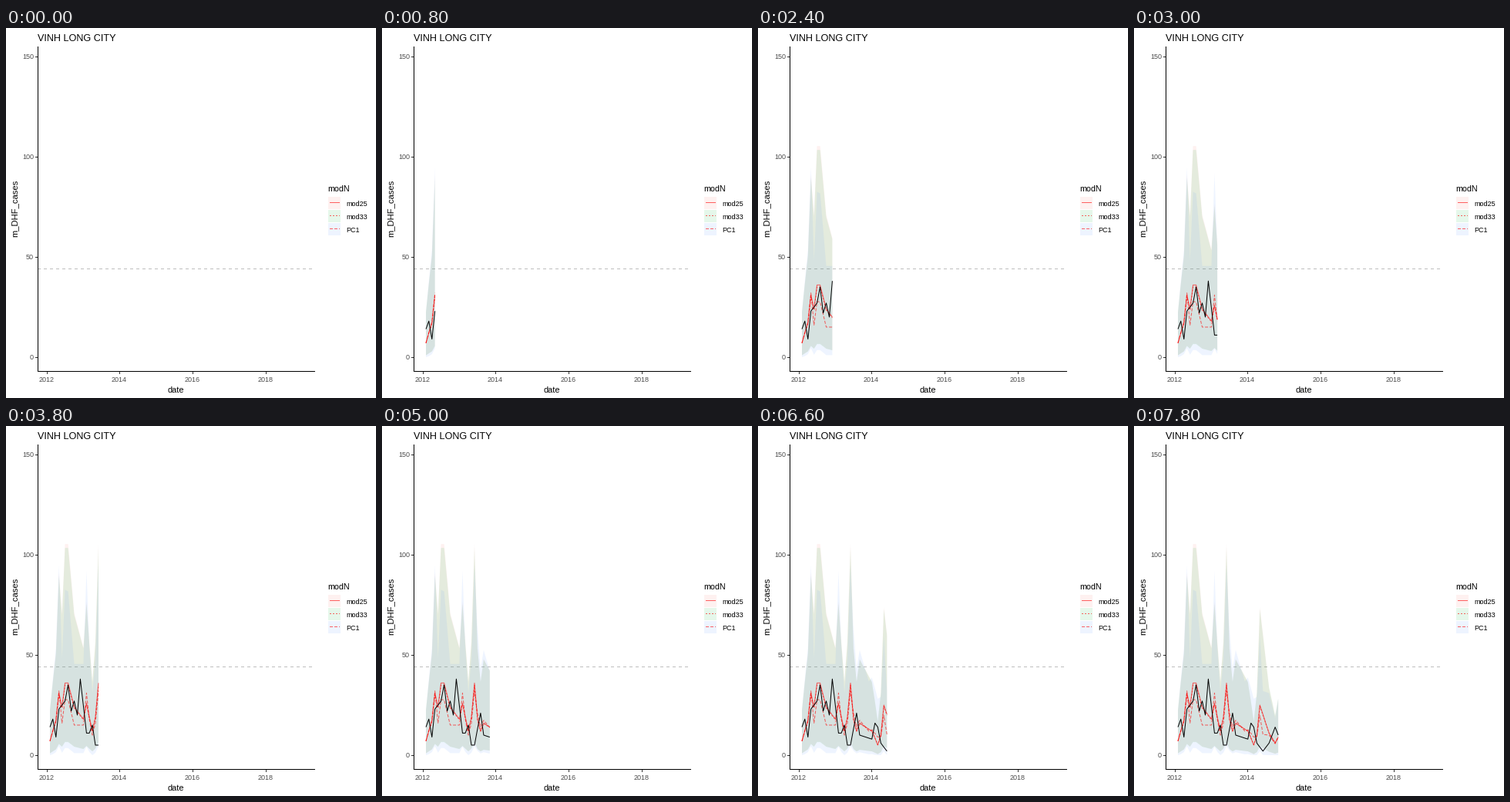
Recreate the animation shown at these times as a matplotlib script. Size 480 px wide and 480 px high, loop 8000 ms.

```python
import numpy as np
import matplotlib.pyplot as plt
from matplotlib.animation import FuncAnimation
from matplotlib.patches import Polygon, Rectangle

plt.rcParams["font.family"] = ["Liberation Sans", "DejaVu Sans"]
plt.rcParams["lines.scale_dashes"] = False

FRAMES, INTERVAL = 40, 200
REVEAL = 100          # frames the full reveal up to the end of 2018 would take
MONTHS = 34
RED, LINE_ALPHA, FILL_ALPHA = "#ff0000", 0.6, 0.1
FILLS = ["#f8766d", "#00ba38", "#619cff"]
NAMES = ["mod25", "mod33", "PC1"]
DASHES = ["-", (0, (2, 2)), (0, (4, 2))]

# Month ends, as days since the first one
ends = np.arange("2012-02", "2019-02", dtype="M8[M]").astype("M8[D]") - np.timedelta64(1, "D")
days = (ends - ends[0]).astype(int)[:84]
month = np.arange(MONTHS)


def day_x(day):
    return 57 + 0.1296 * day


def val_y(value):
    return 427 - 2.6 * np.asarray(value, float)


def through(*points):
    """Monthly values on straight runs between (month, value) turning points."""
    return np.interp(month, *zip(*points))


cases = through((0, 14), (1, 18), (2, 9), (3, 23), (5, 27), (6, 35), (7, 22),
                (8, 27), (9, 20), (10, 38), (12, 11), (13, 11), (14, 15), (15, 5),
                (16, 5), (18, 21), (19, 10), (23, 8), (24, 16), (25, 14), (26, 6),
                (28, 2), (30, 6), (32, 14), (33, 10))
mid25 = through((0, 7), (2, 17), (3, 31), (4, 24), (5, 36), (6, 36), (8, 24),
                (11, 18), (12, 26), (14, 12), (15, 19), (16, 36), (17, 18),
                (18, 12), (19, 16), (23, 12), (25, 5), (26, 10), (27, 25),
                (30, 11), (32, 6), (33, 9))
shift = through((0, 0), (3, 1), (4, -8), (8, -9), (11, -3), (12, 5), (13, -1),
                (16, -4), (17, 3), (22, -1), (25, 4), (28, -10), (30, -1), (33, 0))

# The interval of each model widens in proportion to its mean
mids = [mid25, 0.96 * mid25 + 0.4, mid25 + shift]
ups = [2.87 * mids[0] + 2, 2.9 * mids[1] + 2, 2.9 * mids[2] + 2]
lows = [np.maximum(0, 0.2 * m - d) for m, d in zip(mids, (0.5, 0.5, 2))]

row_x = day_x(days[:MONTHS])
row_frame = np.round(days[:MONTHS] * (REVEAL - 1) / days[-1])

fig = plt.figure(figsize=(480 / 72, 480 / 72), dpi=72, facecolor="white")
ax = fig.add_axes([0, 0, 1, 1])
ax.set_xlim(0, 480)
ax.set_ylim(480, 0)
ax.axis("off")


def stroke(xs, ys, color="black", z=3, lw=1, **kw):
    line, = ax.plot(xs, ys, color=color, lw=lw, zorder=z, snap=False,
                    solid_capstyle="butt", dash_capstyle="butt", **kw)
    return line


def label(x, y, text, size, ha="left", color="black", **kw):
    ax.text(x, y, text, fontsize=size, ha=ha, va="baseline", color=color, **kw)


# Axes, ticks and titles
label(41, 17, "VINH LONG CITY", 12.6)
label(220.5, 473, "date", 11, "center")
label(14.5, 234, "m_DHF_cases", 11.3, "center", rotation=90, rotation_mode="anchor")
stroke([41.5, 41.5], [24, 446], z=6)
stroke([41, 401], [445.5, 445.5], z=6)
for v in (0, 50, 100, 150):
    y = val_y(v)
    tick = np.floor(y) + 0.5
    stroke([38, 41], [tick, tick], "#333333")
    label(36, y + 3.5, str(v), 9, "right", "#4d4d4d")
for year in (2012, 2014, 2016, 2018):
    day = (np.datetime64(f"{year}-01-01") - ends[0]).astype(int)
    x = np.floor(day_x(day)) + 0.5
    stroke([x, x], [446, 449], "#333333")
    label(x - 0.5, 459, str(year), 9, "center", "#4d4d4d")
stroke([41, 401], [312.5, 312.5], "#bebebe", 1, ls=(0, (4, 4)))

# Legend
label(417.5, 212, "modN", 10.6)
for i, name in enumerate(NAMES):
    top = 218 + 17 * i
    ax.add_patch(Rectangle((418, top + 1), 16, 16, fc=FILLS[i], alpha=FILL_ALPHA, lw=0))
    stroke([420, 433], [top + 8.5] * 2, RED, alpha=LINE_ALPHA, ls=DASHES[i])
    label(441, top + 13, name, 9)

# Moving parts
bands = [ax.add_patch(Polygon(np.zeros((3, 2)), fc=c, alpha=FILL_ALPHA, lw=0,
                              zorder=2)) for c in FILLS]
black = stroke([], [], z=4)
reds = [stroke([], [], RED, alpha=LINE_ALPHA, ls=d) for d in DASHES]


def update(frame):
    # Frames between two month ends stop part of the way along the segment
    pos = np.interp(frame, row_frame, month)
    idx = np.append(np.arange(np.ceil(pos)), pos)

    def reveal(data):
        return np.interp(idx, month, data)

    xs = reveal(row_x)
    for band, low, up in zip(bands, lows, ups):
        ys = np.append(val_y(reveal(up)), val_y(reveal(low))[::-1])
        band.set_xy(np.column_stack([np.append(xs, xs[::-1]), ys]))
    for line, data in zip([black] + reds, [cases] + mids):
        line.set_data(xs, val_y(reveal(data)))
    for part in bands + [black] + reds:
        part.set_visible(frame > 0)
    return bands + [black] + reds


anim = FuncAnimation(fig, update, frames=FRAMES, interval=INTERVAL,
                     init_func=lambda: update(0), repeat=True, repeat_delay=0)
plt.show()
```
